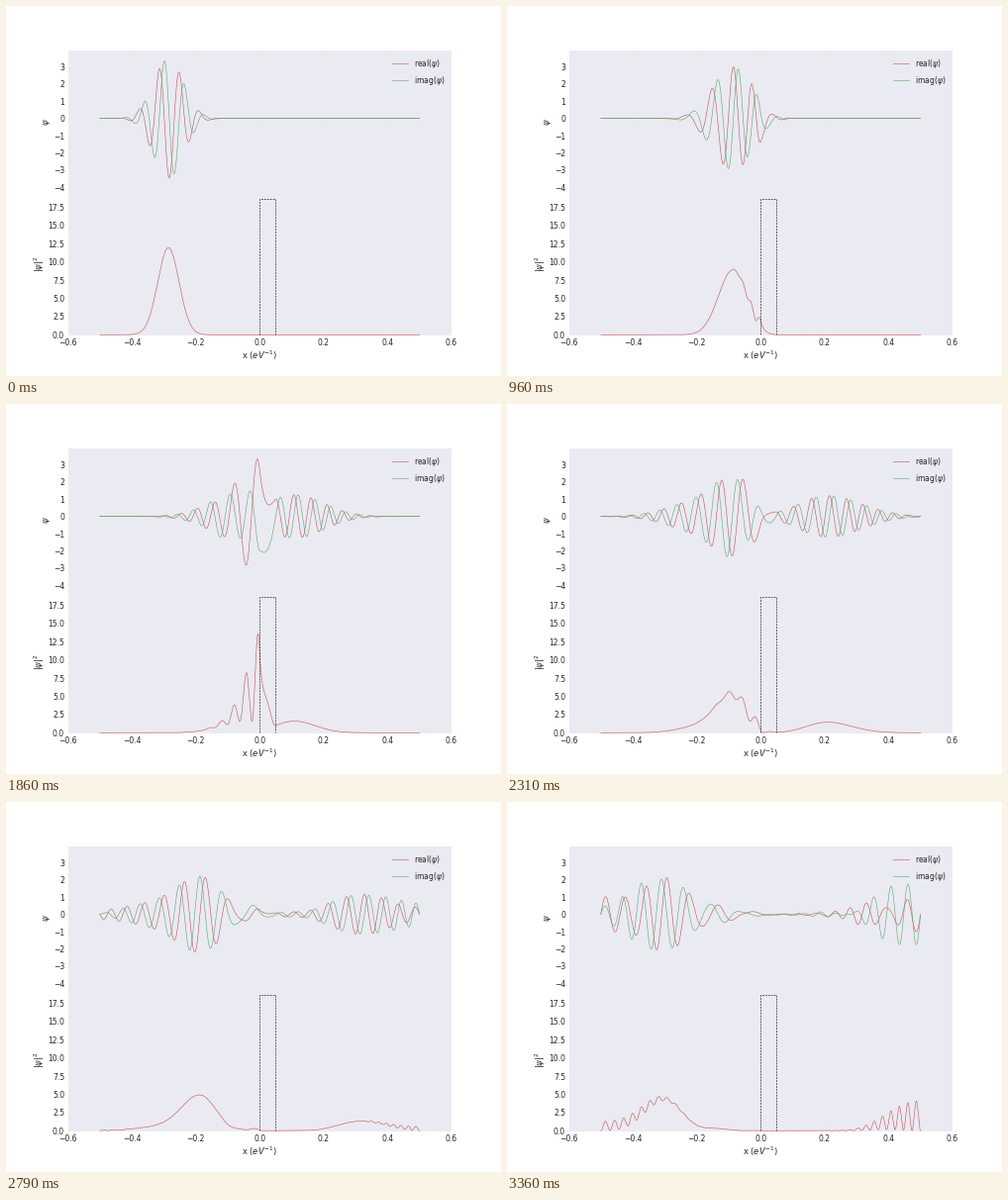
A matplotlib script for the animation above (3390 ms loop, 500 by 374 pixels).

```python
import numpy as np
import matplotlib.pyplot as plt
from matplotlib.animation import FuncAnimation
from matplotlib.lines import Line2D

W, H, DPI = 500, 374, 50
FRAMES, INTERVAL = 113, 30

INK = "#262626"
RED, GREEN, PANEL = "#C44E52", "#55A868", "#EAEAF2"
THIN = 0.8

# Wave packet and barrier, in units with hbar = m = 1
K0, X0, SIGMA = 100.0, -0.2855, 0.0333
BARRIER, WIDTH = 5350.0, 0.05
DT = 6.22e-5
CELLS = 1000


def evolve():
    """Return the grid and psi[frame, x] between hard walls at +-0.5."""
    dx = 1 / CELLS
    x = (np.arange(CELLS + 1) - CELLS // 2) * dx
    inner = x[1:-1]
    inside = (inner > -dx / 2) & (inner < WIDTH - dx / 2)
    hop = np.full(inner.size - 1, -0.5 / dx**2)
    ham = np.diag(1 / dx**2 + BARRIER * inside)
    ham += np.diag(hop, 1) + np.diag(hop, -1)
    energy, modes = np.linalg.eigh(ham)

    start = np.exp(-(inner - X0) ** 2 / (4 * SIGMA**2) + 1j * K0 * inner)
    start /= (2 * np.pi * SIGMA**2) ** 0.25
    coeff = modes.T @ start
    t = np.arange(FRAMES)[:, None] * DT
    psi = np.zeros((FRAMES, x.size), complex)
    psi[:, 1:-1] = (coeff * np.exp(-1j * energy * t)) @ modes.T
    return x, psi


x, psi = evolve()

plt.rcParams.update({
    "font.family": "DejaVu Sans",
    "font.size": 11,
    "text.color": INK,
    "xtick.color": INK,
    "ytick.color": INK,
})
fig, (top, low) = plt.subplots(
    2, 1, sharex=True, figsize=(W / DPI, H / DPI), dpi=DPI, facecolor="white"
)
fig.subplots_adjust(left=0.125, right=0.9, bottom=0.11, top=0.88, hspace=0)

for ax in (top, low):
    ax.set_facecolor(PANEL)
    ax.set_axisbelow(True)
    ax.grid(color="white", lw=0.7, alpha=0.3)
    ax.tick_params(length=0, pad=5, labelsize=11)
    for spine in ax.spines.values():
        spine.set_visible(False)
top.tick_params(labelbottom=False)

top.set_xlim(-0.6, 0.6)
top.set_ylim(-4.32, 3.95)
top.set_yticks(range(-4, 4))
low.set_ylim(-0.08, 19.5)
low.set_yticks(np.arange(0, 18, 2.5))

real, = top.plot([], [], color=RED, lw=THIN)
imag, = top.plot([], [], color=GREEN, lw=THIN)
prob, = low.plot([], [], color=RED, lw=THIN)
low.plot([0, 0, WIDTH, WIDTH], [0, 18.64, 18.64, 0], "k--", lw=THIN)


def label(px, py, text, size=11, **kw):
    fig.text(px / W, 1 - py / H, text, fontsize=size, **kw)


centred = dict(ha="center", va="center")
label(256.3, 353, "x ($eV^{-1}$)", 12, **centred)
label(41.2, 117, r"$\psi$", 12, rotation=90, **centred)
label(34, 261, r"$|\psi|^2$", 12, rotation=90, **centred)

for py, color, name in ((58, RED, "real"), (75, GREEN, "imag")):
    fig.add_artist(Line2D([390 / W, 406 / W], [1 - py / H] * 2, color=color, lw=THIN))
    label(412.3, py + 3, name + r"($\psi$)", va="baseline")


def update(i):
    real.set_data(x, psi[i].real)
    imag.set_data(x, psi[i].imag)
    prob.set_data(x, np.abs(psi[i]) ** 2)
    return real, imag, prob


anim = FuncAnimation(fig, update, frames=FRAMES, interval=INTERVAL, repeat=True)
plt.show()
```
